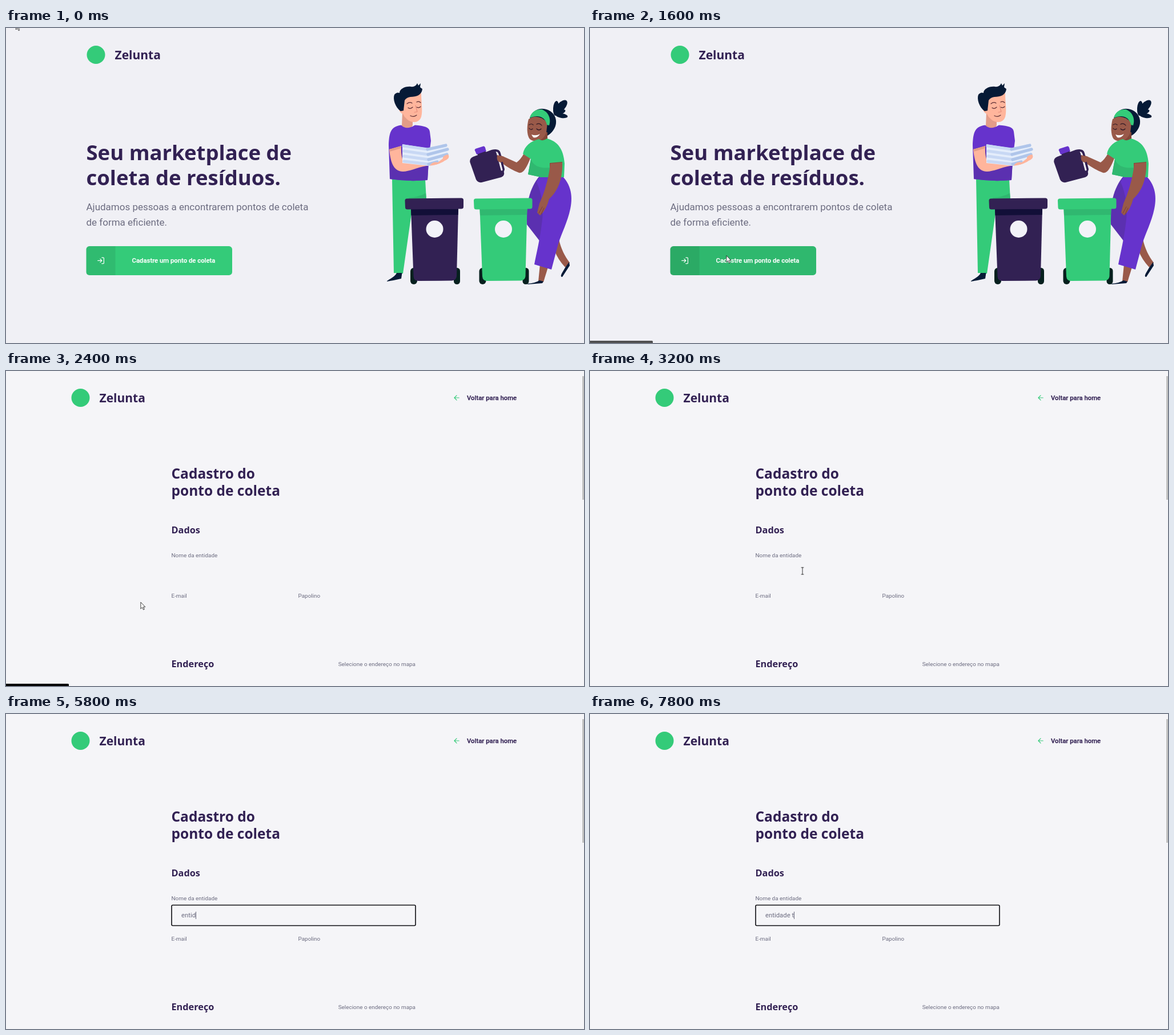
Recreate the animation shown at these times as an HTML page. Size 1012 by 553 pixels, loop 8000 ms.

```html
<!DOCTYPE html>
<html lang="pt-BR">
<head>
<meta charset="utf-8">
<title>Zelunta</title>
<style>
  html, body { margin: 0; width: 100%; height: 100%; overflow: hidden; background: #f0f0f5; }
  svg { display: block; width: 1012px; height: 553px; }
  text { font-family: Roboto, sans-serif; fill: #6c6c80; }
  .title { font-family: "Open Sans", "Noto Sans", sans-serif; font-weight: 700; fill: #322153; }
  .brand { font-size: 21px; }
  .h1 { font-size: 36.5px; }
  .h2 { font-size: 24.5px; }
  .h3 { font-size: 16.3px; }
  .lead { font-size: 17px; }
  .label { font-size: 9.92px; }
  .field { font-size: 11.33px; white-space: pre; }
  .strong { font-size: 11.33px; font-weight: 500; stroke-width: .25px; }
  .option { font: 600 8.5px "Open Sans", sans-serif; fill: #fff; }
  .icon { fill: none; stroke-width: 2; stroke-linecap: round; stroke-linejoin: round; }
  .line { fill: none; stroke-linecap: round; stroke-linejoin: round; }
  #button { fill: #34cb79; }
  .hover #button { fill: #2fb86e; }
  .purple { fill: #6633cc; }
  .violet { fill: #5b30b0; }
  .green { fill: #34cb79; }
  .moss { fill: #30b870; }
  .dark { fill: #322153; }
  .navy { fill: #061a36; }
  .skin { fill: #ffb59c; }
  .blush { fill: #e39c88; }
  .brown { fill: #995949; }
  .umber { fill: #834638; }
</style>
</head>
<body>
<svg viewBox="0 0 1012 553" xmlns="http://www.w3.org/2000/svg">
  <defs>
    <g id="brand">
      <circle cx="17" cy="47" r="16" class="green"/>
      <text x="50" y="55" class="title brand">Zelunta</text>
    </g>
    <g id="bin">
      <rect x="708" y="421" width="12" height="29" rx="6" fill="#06201e"/>
      <rect x="784" y="421" width="11" height="29" rx="5.5" fill="#06201e"/>
      <path fill="currentColor" d="M709 317L792 316L789 436Q788 443 781 443.500L722 444Q714 444 713.500 436Z"/>
      <path fill="var(--shade)" d="M709 318H792L791.500 328L709.500 329Z"/>
      <path fill="currentColor" d="M702 299.500L797 298.500Q801 298.500 801 302V314Q801 317.500 797 317.500L703 318.500Q699 318.500 699 315L698.500 303Q698.500 299.500 702 299.500Z"/>
      <circle cx="750.500" cy="353" r="15" fill="#f2f2f8"/>
    </g>
  </defs>

  <g id="home">
    <rect width="1012" height="553" fill="#f0f0f5"/>
    <use href="#brand" x="140.500"/>
    <text x="140.500" y="232" class="title h1">Seu marketplace de</text>
    <text x="140.500" y="276" class="title h1">coleta de resíduos.</text>
    <text x="140.500" y="320" class="lead">Ajudamos pessoas a encontrarem pontos de coleta</text>
    <text x="140.500" y="347" class="lead">de forma eficiente.</text>

    <rect id="button" x="140.500" y="383" width="255.500" height="51" rx="5.600"/>
    <path d="M146 383H191.500V434H146Q140.500 434 140.500 428.500V388.500Q140.500 383 146 383Z" opacity=".08"/>
    <path class="icon" stroke="#fff" transform="translate(159 401.300) scale(.59)"
      d="M15 3H19A2 2 0 0 1 21 5V19A2 2 0 0 1 19 21H15M10 17L15 12L10 7M15 12H3"/>
    <text x="293.500" y="412" text-anchor="middle" class="strong" style="fill:#fff;stroke:#fff">Cadastre um ponto de coleta</text>

    <!-- man -->
    <path class="green" d="M676 264L734 266L736 302L711 318L695 431L679 430Z"/>
    <path class="moss" d="M705 298Q722 297 735 290L736 302H705Z"/>
    <path class="navy" d="M666 445C672 440 681 437 684 430H693.500L692 440Q680 443 666 445Z"/>
    <path class="blush" d="M694 148H712V171Q706 183 693 172Z"/>
    <path class="purple" d="M670 206C671 186 672 173 692 170.500Q701 180 716 170.500C733 172 741 174 742 182L744 198L740 230L738 267Q704 270 672 265Z"/>
    <path class="violet" d="M672 212L692 207L696 236H740L738 267Q704 270 672 265Z"/>
    <path class="skin" d="M671 213L692 207Q691 224 696 236H742C750 230 764 224 774 222C778 227 773 232 766 232C760 240 745 242 736 242C719 245 706 252 695 252C677 252 673 232 671 213Z"/>
    <path class="blush" d="M671 213L692 207V211L672 217Z"/>
    <path fill="#e4edfb" d="M694 204L738 211L772 203L773 230L740 242L694 237Z"/>
    <g class="line" stroke-width="5.200">
      <path stroke="#c8d8f4" d="M696 207L738 213M697 216L739 222M697 225L740 231M697 234L740 239"/>
      <path stroke="#afc5ea" d="M738 213L770 206M739 222L773 213M740 231L772 222M740 239L755 235"/>
    </g>
    <path class="skin" d="M742 241Q748 234 756 236L765 229Q764 224 774 222Q778 229 768 233Q757 241 742 241Z"/>
    <path class="skin" d="M692 121L727 114C727 130 730 146 727 156C723 168 709 167 702 160Q697 156 695 151C687 148 685 136 692 135Z"/>
    <path class="navy" d="M691 146C681 139 677 124 680 117Q684 112 689 114C689 107 699 102 709 103Q717 104 720 97L722 101L726 97L725 104L729 107C728 118 718 121 708 121Q701 122 698 127L696 145Z"/>
    <g class="line" stroke="#5b2e35" stroke-width="1.200">
      <path d="M702 133Q707 129 711 132M719 130Q723 128 726 131M704 140Q708 143 712 139M719 139Q723 141 726 138M708 154Q714 157 719 153"/>
      <path stroke="#e58e7d" d="M717 136L720 147L715 148"/>
    </g>

    <!-- woman -->
    <path class="brown" d="M968 371C972 388 978 400 987 412L979 420Q966 406 960 390Z"/>
    <path class="navy" d="M986 411L987 417L974 437Q970 437 973 431L980 419Z"/>
    <path class="brown" d="M935 415L949 420L941 446L932 445Z"/>
    <path class="navy" d="M912 449Q927 448 934 443L941 445L939 448L914 450Z"/>
    <path class="violet" d="M934 260C916 282 910 310 912 345L936 376L965 300Z"/>
    <path class="purple" d="M935 260H974C992 278 993 302 986 326C980 348 970 366 965 386L955 424L925 415C929 394 935 370 938 344Q944 305 929 270Z"/>
    <g class="navy">
      <path d="M917 158C922 143 938 137 953 146C969 157 965 179 948 189Z"/>
      <ellipse cx="972" cy="138" rx="7" ry="14" transform="rotate(42 972 138)"/>
      <ellipse cx="963" cy="141" rx="5" ry="13" transform="rotate(4 963 141)"/>
      <ellipse cx="973" cy="154" rx="10.500" ry="4" transform="rotate(8 973 154)"/>
      <ellipse cx="970" cy="148" rx="10" ry="4" transform="rotate(-20 970 148)"/>
    </g>
    <path class="umber" d="M934 183H948V202Q938 205 931 197Z"/>
    <path class="brown" d="M915 160Q931 149 948 166L946 184C940 199 926 202 917 195C911 187 912 171 915 160Z"/>
    <path class="green" d="M917 158C919 148 928 142 938 143C950 147 955 160 951 171L947 170C945 157 932 151 917 158Z"/>
    <path class="line" stroke="#2c1725" stroke-width="1.200"
      d="M916 170Q920 167 923 170M929 169Q934 166 938 171M916 176Q919 180 922 177M929 177Q933 181 937 177"/>
    <path fill="#fff" d="M920 187Q928 190 935 186Q930 194 923 192Z"/>
    <path class="brown" d="M907 220L918 229C912 244 906 256 898 254Q884 249 868 237C858 237 857 226 862 222L874 227L894 236Q901 231 907 220Z"/>
    <path class="green" d="M905 221C908 207 918 199 933 195Q940 200 947 194C966 199 976 212 978 238L977 262H937L914 257L919 230Z"/>
    <path class="moss" d="M919 230Q925 248 953 245L951 262H937L914 257Z"/>
    <path class="umber" d="M952 237L974 235V242L952 246Z"/>
    <path class="brown" d="M953 238L974 236C975 263 967 286 951 300Q946 320 935 329L930 324L934 308Q949 275 953 238Z"/>
    <path class="line" stroke="#73382d" stroke-width=".8" d="M933 325L939 314M937 327L942 316"/>

    <!-- jug -->
    <path class="dark" d="M825 221L839 215L842 221L828 226Z"/>
    <path class="purple" d="M822 212L836 207.500Q839 207 840 214L841 216L824 222L820.500 214Z"/>
    <path class="line" stroke="#322153" stroke-width="4" d="M851 216Q862 213 864 220L871 248L868 257"/>
    <path class="dark" d="M818 226L850 214Q856 213 858 218L872 254Q873 259 867 262L833 271Q826 272 823 266L812.500 236Q811 229 818 226Z"/>
    <path class="line" stroke="#f0f0f5" stroke-width="3" d="M861 222L868 249"/>
    <path class="brown" d="M860 223L872 226L874 234L865 236Q858 234 860 223Z"/>

    <use href="#bin" style="color:#322153;--shade:#120f38"/>
    <use href="#bin" x="120.500" style="color:#34cb79;--shade:#30b870"/>
  </g>

  <g id="form">
    <rect width="1012" height="553" fill="#f5f5f8"/>
    <use href="#brand" x="113.500"/>
    <path class="icon" stroke="#34cb79" transform="translate(782 39.900) scale(.59)" d="M19 12H5M12 19L5 12L12 5"/>
    <text x="807" y="51" class="strong" style="fill:#322153;stroke:#322153">Voltar para home</text>
    <text x="289.500" y="189" class="title h2">Cadastro do</text>
    <text x="289.500" y="218.500" class="title h2">ponto de coleta</text>
    <text x="289.500" y="285" class="title h3">Dados</text>
    <text x="289.500" y="327" class="label">Nome da entidade</text>
    <text x="289.500" y="398" class="label">E-mail</text>
    <text x="511.500" y="398" class="label">Papolino</text>
    <text x="289.500" y="520" class="title h3">Endereço</text>
    <text x="717" y="518" text-anchor="end" class="label">Selecione o endereço no mapa</text>
    <rect x="1009" y="9" width="3" height="217" fill="#c1c1c1"/>

    <g id="focus">
      <rect x="290" y="335.500" width="427" height="36" rx="2" fill="none" stroke="#0c0c10" stroke-width="1.600"/>
      <text id="typed" x="307" y="357" class="field"></text>
      <rect id="caret" y="347" width="1" height="13" fill="#6c6c80"/>
    </g>
    <g id="popup">
      <rect x="289.500" y="374" width="136" height="36.500" rx="3" opacity=".25"/>
      <rect x="289.500" y="372.500" width="136" height="36.500" rx="3" fill="#292a2d"/>
      <text x="298" y="394" class="option">teste entidade</text>
    </g>
  </g>

  <path id="status" d="M0 549H108.500Q110 549 110 550.500V553H0Z"/>
  <g id="pointer">
    <path id="arrow" fill="#fff" stroke="#111" stroke-width=".8" d="M.4 .4V12L3 9.400L5 13.600L6.800 12.800L4.900 8.700H8.300Z"/>
    <path id="beam" class="line" stroke="#222" stroke-width=".9" d="M-2 -6H2M0 -6V6M-2 6H2"/>
  </g>
</svg>

<script>
  const LOOP = 8000, STEP = 100;
  const $ = id => document.getElementById(id);
  const show = (id, on) => { $(id).style.display = on ? '' : 'none'; };
  const within = (t, from, to) => t >= from && t < to;
  const clamp = v => Math.min(1, Math.max(0, v));
  const ease = p => p * p * (3 - 2 * p);

  // pointer stops: time, x, y
  const path = [
    [500, 17, -9], [1300, 239, 378], [1400, 240, 396], [1900, 236, 405],
    [2300, 236, 405], [2400, 235.5, 405.5], [2500, 235.5, 405.5],
    [3000, 367, 316], [3200, 372, 351]
  ];
  // time of each key press
  const word = 'entidade t';
  const keys = [4700, 4900, 5300, 5400, 5800, 6000, 6200, 6300, 6500, 7800];

  function pointerAt(t) {
    const i = path.findIndex(p => p[0] > t);
    if (i === 0) return path[0].slice(1);
    if (i < 0) return path[path.length - 1].slice(1);
    const [t0, x0, y0] = path[i - 1], [t1, x1, y1] = path[i];
    const p = ease((t - t0) / (t1 - t0));
    return [x0 + (x1 - x0) * p, y0 + (y1 - y0) * p];
  }

  function draw(now) {
    const t = Math.floor(now % LOOP / STEP) * STEP;
    const onForm = t >= 2400;
    show('home', !onForm);
    show('form', onForm);
    $('home').classList.toggle('hover', t >= 1400);
    $('status').style.opacity = clamp((t - 1400) / 300) * clamp((3000 - t) / 300);

    const [x, y] = pointerAt(t);
    const overField = onForm && x > 290 && within(y, 335, 372);
    $('pointer').setAttribute('transform', `translate(${x} ${y})`);
    show('pointer', t < 4700);
    show('arrow', !overField);
    show('beam', overField);

    show('focus', t >= 3600);
    show('popup', within(t, 4800, 5000));
    const typed = $('typed');
    typed.textContent = word.slice(0, keys.filter(k => k <= t).length);
    $('caret').setAttribute('x', Math.floor(307 + typed.getComputedTextLength()));
    show('caret', !within(t, 4200, 4700) && !within(t, 7000, 7500));
  }

  const start = performance.now();
  function tick() {
    draw(performance.now() - start);
    requestAnimationFrame(tick);
  }
  tick();
</script>
</body>
</html>
```
